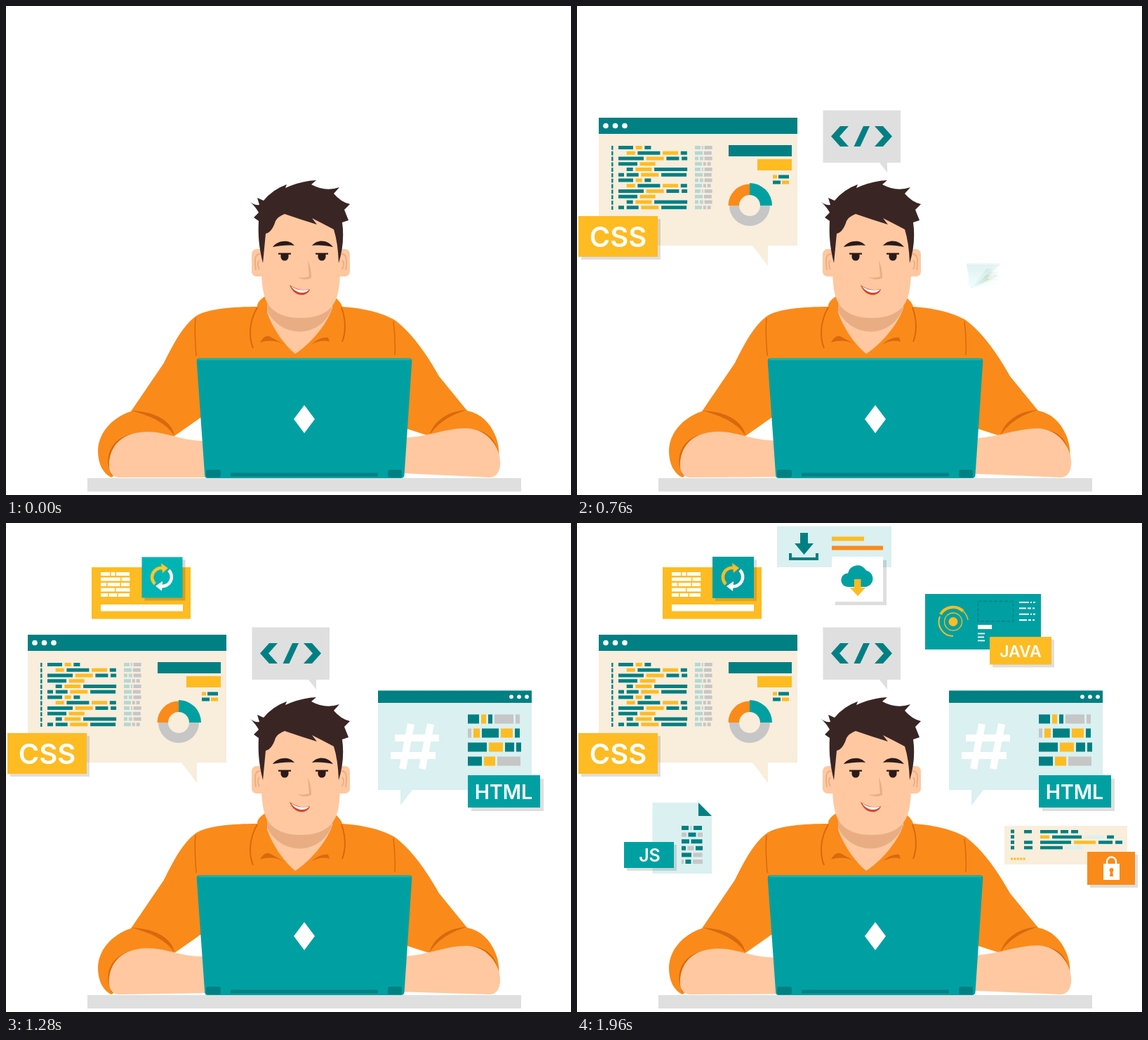
Animation, 805 px wide and 696 px high, one loop 2000 ms. Source, as an HTML page:

```html
<!DOCTYPE html>
<html lang="en">
<head>
<meta charset="utf-8">
<title>Developer at work</title>
<style>
  html, body { margin: 0; width: 100%; height: 100%; overflow: hidden; background: #fff; }
  svg { display: block; width: 100%; height: 100%; }
  text { font: 600 30px Inter, "Open Sans", sans-serif; fill: #fff; text-anchor: middle; }
  .pop { isolation: isolate; }
  .pop use { mix-blend-mode: plus-lighter; }
</style>
</head>
<body>
<svg id="stage" viewBox="0 0 805 696" xmlns="http://www.w3.org/2000/svg"></svg>
<script>
const LOOP = 2000, STEP = 40, SAMPLES = 20;
const C = {
  t: '#00a0a2', d: '#008083', y: '#febc22', o: '#fa8b1a', g: '#c6c6c6', p: '#dfdfdf',
  l: '#dbf0f0', m: '#b4d8d5', c: '#f9eddc', w: '#fff',
  fold: '#d9690e', skin: '#ffc8a0', shade: '#e9ad84', hair: '#3a2525', ink: '#2b1a1a'
};

// Drawing helpers: colours are keys of C.
const rect = (c, x1, y1, x2, y2, r = 0) =>
  `<rect x="${x1}" y="${y1}" width="${x2 - x1}" height="${y2 - y1}" rx="${r}" fill="${C[c]}"/>`;
const path = (c, d) => `<path d="${d}" fill="${C[c]}"/>`;
const line = (c, w, d, extra = '') =>
  `<path d="${d}" fill="none" stroke="${C[c]}" stroke-width="${w}" ${extra}/>`;
const dot = (c, x, y, r) => `<circle cx="${x}" cy="${y}" r="${r}" fill="${C[c]}"/>`;
const label = (s, x, y, size) => `<text x="${x}" y="${y}" style="font-size:${size}px">${s}</text>`;
const tag = (c, x1, y1, x2, y2, depth = 4) =>
  `<path d="M${x1 + depth} ${y1 + depth}H${x2 + depth}V${y2 + depth}H${x1 + depth}Z" opacity=".13"/>` +
  rect(c, x1, y1, x2, y2);

// Rows of bars such as "d21 y9": colour and width; "_" is an empty stretch.
function rows(x0, y0, pitch, height, gap, list) {
  return list.map((row, i) => {
    let x = x0;
    return row.split(' ').map(cell => {
      const w = +cell.slice(1), y = y0 + i * pitch;
      const bar = cell[0] === '_' ? '' : rect(cell[0], x, y, x + w, y + height);
      x += w + gap;
      return bar;
    }).join('');
  }).join('');
}

const desk = rect('p', 116, 672, 734, 691);

const body =
  path('o', `M358 428C357 421 367 414 373 411H466C473 418 478 423 479 428C512 430 538 438 554 447
    C578 465 599 495 617 527L657 576C640 578 615 592 603 612L572 602L560 590H300L277 586L240 612
    C230 590 200 578 178 577L225 508C238 482 251 456 271 441C288 431 322 428 358 428Z`) +
  path('o', `M178 577C150 586 131 609 131 633C131 652 138 665 150 671L200 640L240 612
    C232 590 205 576 178 577Z`) +
  path('o', `M657 576C635 576 612 590 603 612L650 640L700 655C704 640 703 625 697 611
    C689 592 676 580 657 576Z`) +
  path('fold', 'M150 668C138 641 148 608 199 606L180 650Z') +
  path('fold', 'M702 640C698 610 676 597 640 604L670 650Z') +
  path('fold', 'M178 576C213 577 237 591 240 612C231 597 211 584 178 576Z') +
  path('fold', 'M657 575C631 576 609 590 603 612C612 597 629 583 657 575Z') +
  line('fold', 1.5, 'M270 444C268 462 270 480 271 498M552 449C554 465 555 480 554 497') +
  path('skin', 'M372 411V436C380 460 398 484 412 495C432 482 456 456 465 430V411Z') +
  path('shade', 'M372 418V434C392 473 446 474 464 432V418Z') +
  line('fold', 2, 'M358 429C347 448 345 470 352 487M478 429C484 446 485 462 479 478') +
  path('fold', 'M362 479C366 472 370 469 375 470L397 482C384 476 375 475 362 479Z') +
  path('fold', 'M436 481C444 474 453 471 459 472L461 478C452 475 445 477 436 481Z');

const ear = `<rect x="350" y="346" width="24" height="39" rx="7" fill="${C.skin}"/>` +
  line('shade', 1.8, 'M362 353C354 353 354 362 356 376M361 362C357 366 359 371 361 375');
const eye = x => line('ink', 2.2, `M${x - 9} 352.6H${x + 9}`) +
  path('ink', `M${x - 5.5} 353H${x + 5.5}V357A5.5 5.5 0 0 1 ${x - 5.5} 357Z`);

const head =
  ear + `<g transform="matrix(-1 0 0 1 840 0)">${ear}</g>` +
  path('skin', 'M364 285H476V372C476 404 472 421 461 431C450 441 436 444 420 444C404 444 390 441 379 431C368 421 364 404 364 372Z') +
  path('hair', `M366 366C360 342 359 325 360 306L353 301L360 294Q355 285 348 279Q354 284 361 283L358 273L367 277
    Q380 261 400 254L398 259Q420 249 442 248L435 254Q455 265 475 258L467 267Q477 279 490 282L482 290L488 305L479 308
    Q483 337 474 366Q473 337 467 318Q450 309 436 302L443 311Q420 304 397 296Q387 300 384 306Q379 322 370 324Z`) +
  path('ink', 'M380 343C386 334 403 331 411 341C401 340 391 341 380 343Z') +
  path('ink', 'M436 341C444 331 459 333 466 343C456 341 447 340 436 341Z') +
  eye(397) + eye(450) +
  path('shade', 'M430 362Q435 373 435 387Q425 392 415 386Q424 388 432 385Z') +
  `<path d="M404 397Q418 407 433 403C430 414 411 416 404 397Z" fill="#d8452f"/>` +
  path('w', 'M406 399Q418 407 432 403.5C426 411 413 409 406 399Z');

const forearmLeft = path('skin', `M147 656C146 636 156 607 200 606C230 606 245 618 281 619H300V671H160
  C151 670 147 663 147 656Z`);
const forearmRight = path('skin', `M704 650C703 628 684 603 655 603C625 604 600 618 568 621H550V672L690 671
  C700 670 704 662 704 650Z`);

const laptop =
  path('t', 'M275 501.500H575Q578.500 501.500 578.300 506L567.500 668Q567 672 563 672H287Q283.500 672 283.200 668L271.700 506Q271.500 501.500 275 501.500Z') +
  `<path d="M274 503H576" stroke="#12b5ae" stroke-width="2.4"/>` +
  rect('d', 285, 660, 306, 671, 3) + rect('d', 544, 660, 564, 671, 3) + rect('d', 320, 664.5, 530, 669.5) +
  path('w', 'M425 568L440 588L425 608L410 588Z');

const bubble =
  path('p', 'M350.500 148.500H461V223H442V237L431 223H350.500Z') +
  path('d', 'M375 171H387L374 185.500L387 200H375L362 185.500Z') +
  path('d', 'M436 171H424L437 185.500L424 200H436L449 185.500Z') +
  path('d', 'M408 171H417L403.500 200H394.500Z');

const listing = ['d21 y9 d9', '_8 y12 d32 y22 d9', 'd36 y25 d18 d8', 'd27 y22', '_8 d9 y23 d47', 'd8 d17 y25 d36'];
const meter = ['m8 m2 g11', 'm11 g11', 'm5 m5 g11', 'm10 g4 g5'];
const cssWindow =
  path('c', 'M31 159H314V341H272V370L250 341H31Z') + rect('d', 31, 159, 314, 182) +
  [41, 54.5, 68].map(x => dot('w', x, 170.5, 3.8)).join('') +
  line('d', 2.4, 'M50.300 199V290', 'stroke-dasharray="5.800 2"') +
  rows(59, 199, 7.75, 5, 3.7, [...listing, ...listing]) +
  rows(168, 199, 7.75, 5, 1.8, [...meter, ...meter, ...meter]) +
  rect('d', 216, 198, 306, 214) + rect('y', 257, 218, 306, 234) +
  rows(279, 240.5, 8, 5, 2, ['y6 d15', 'd11 y10']) +
  path('g', 'M217 284A29 29 0 0 0 275 284H261A15 15 0 0 1 231 284Z') +
  path('o', 'M246 253.500A30.500 30.500 0 0 0 215.500 284H231A15 15 0 0 1 246 269Z') +
  path('t', 'M246 252A32 32 0 0 1 278 284H261A15 15 0 0 0 246 269Z');
const cssTag = tag('y', 2, 299, 115, 357) + label('CSS', 58.5, 343, 40);

const htmlWindow =
  path('l', 'M530 239H749V380H579L562 402V380H530Z') + rect('d', 530, 238.5, 749, 256) +
  [720, 731, 742].map(x => dot('w', x, 247.3, 2.9)).join('') +
  line('w', 10, 'M577 286L565 350M605 286L593 350M554 306H617M548 331H612') +
  rows(658, 272.5, 20, 13, 3, ['d16 y7 d6 g27 g6', 'g5 y9 d24 y17 d7', 'd27 y20 d13 d7', 'd20 y16 g33']);
const htmlTag = tag('t', 658, 359, 761, 405, 5) + label('HTML', 709, 393, 28.5);

const noteCard =
  rect('y', 122, 63, 263, 136.5) +
  rows(135, 70, 7.5, 5, 1.5, ['w13 w6 w19', 'w28 w12', 'w8 w18 w12', 'w20 w20', 'w10 w12 w16']) +
  rect('w', 135, 116, 252, 125.5);
const syncTag = tag('t', 193, 48, 252, 107) +
  line('y', 4.6, 'M212 87A13.500 13.500 0 0 1 224 64') + path('y', 'M221 57L231 64L223 71Z') +
  line('w', 4.6, 'M232 67A13.500 13.500 0 0 1 220 90') + path('w', 'M223 83L213 90L222 97Z');

const downloadCard =
  rect('l', 285, 4.5, 448, 63) +
  path('d', 'M318 14H329V29H337L323.500 45L310 29H318Z') + line('d', 4, 'M304 43V51H342V43') +
  rect('y', 363, 19.5, 409, 25.5) + rect('o', 363, 32.5, 436, 38.5);
const cloudTag = tag('w', 363, 48, 436, 112, 5) +
  path('t', 'M386 91A9.500 9.500 0 0 1 386 71.500A14 14 0 0 1 412 67.500A12 12 0 0 1 412 91Z') +
  path('y', 'M395 80H404.500V92H411L400 104L389 92H395Z');

const javaCard =
  rect('t', 496, 101, 661, 180) + dot('y', 536, 140.5, 6.5) +
  `<circle cx="536" cy="140.5" r="12.500" fill="none" stroke="${C.y}" stroke-width="1.300"/>` +
  line('y', 2, 'M536 161A20.500 20.500 0 0 1 517 133') +
  line('y', 4, 'M518 130A20.500 20.500 0 0 1 550 125.500') +
  line('y', 1.5, 'M550 125.500A20.500 20.500 0 0 1 557 138') +
  line('d', 1.5, 'M571.500 111.500H621.500V140H571.500Z', 'stroke-dasharray="5 2.500"') +
  rows(630, 112, 8.4, 2, 2, ['w14 w2 w3', 'w10 w5 w3', 'w14 w2 w3', 'w11 w4 w3']) +
  rect('w', 571, 145, 591, 151) + rows(571, 156.5, 5, 1.8, 1, ['w10', 'w9', 'w10']);
const javaTag = tag('y', 588, 162, 676, 201.5) + label('JAVA', 632, 190.5, 23);

const jsPage =
  path('l', 'M107.500 398H173L192 417V499H107.500Z') + path('d', 'M173 398L192 417H173Z') +
  rows(149, 431, 9.6, 6, 2.5, ['d10 g2 d12', 'g7 d11 g7', 'd11 d16', 'd6 g9 d10', 'd14 g13', 'g3 d8 g14']);
const jsTag = tag('t', 67, 454, 138, 491) + label('JS', 103.5, 482, 25);

const lockCard =
  rect('c', 609, 431, 784, 486) + rows(618, 436.5, 7.7, 5, 1, ['d5', 'd5', 'd5', 'd5']) +
  rows(637, 437, 7.6, 4.6, 4, ['d11 _4 d25 d11 d10', '_11 _4 y13 d42 l28 d10', 'd12 _3 d44 y31 d20 d10', 'd12 _3 d32 l24']) +
  rows(618, 476.5, 1, 3, 1.4, ['y3 y3 y3 y3 y3']);
const lockTag = tag('o', 727, 468, 795, 515) +
  line('w', 2.5, 'M755 487V482A6.500 6.500 0 0 1 768 482V487') + rect('w', 750, 485, 773, 508) +
  dot('o', 761.5, 494, 3) + path('o', 'M760 495H763L764 503H759Z');

// Each pop: art, start time, point it grows from; tags follow their panel.
const pops = [];
const panel = (start, x, y, art) => pops.push({ art, start, x, y, length: 90, shutter: 20, ease: p => p });
const badge = (start, x, y, art) =>
  pops.push({ art, start: start + 70, x, y, length: 100, shutter: 8, ease: p => 1 - (1 - p) ** 2 });
panel(340, 441, 236, bubble);
panel(540, 272, 370, cssWindow);      badge(540, 58.5, 328, cssTag);
panel(740, 562, 402, htmlWindow);     badge(740, 709.5, 382, htmlTag);
panel(1120, 192.5, 100, noteCard);    badge(1120, 222.5, 77.5, syncTag);
panel(1320, 366, 34, downloadCard);   badge(1320, 399.5, 80, cloudTag);
panel(1520, 578, 140, javaCard);      badge(1520, 632, 182, javaTag);
panel(1770, 150, 448, jsPage);        badge(1770, 102.5, 472.5, jsTag);
panel(1770, 696, 458, lockCard);      badge(1770, 761, 491.5, lockTag);

const stage = document.getElementById('stage');
stage.innerHTML =
  `<defs>${pops.map((p, i) => `<g id="art${i}">${p.art}</g>`).join('')}</defs>` +
  body + `<g id="armL">${forearmLeft}</g><g id="armR">${forearmRight}</g>` + head +
  '<path d="M0 672H805V696H0Z" fill="#fff"/>' + desk + laptop +
  pops.map((p, i) => `<g class="pop">${`<use href="#art${i}"/>`.repeat(SAMPLES)}</g>`).join('');

const armL = document.getElementById('armL'), armR = document.getElementById('armR');
stage.querySelectorAll('.pop').forEach((group, i) => {
  pops[i].group = group;
  pops[i].copies = [...group.children];
});

const clamp = v => Math.min(1, Math.max(0, v));

// Averages several moments of the open shutter to smear the fast growth.
function drawPop(pop, time) {
  const age = time - pop.start;
  pop.group.style.display = age > 0 ? '' : 'none';
  if (age <= 0) return;
  const settled = age >= pop.length + pop.shutter;
  pop.copies.forEach((copy, k) => {
    const moment = age - pop.shutter * k / SAMPLES;
    const s = settled ? 1 : pop.ease(clamp(moment / pop.length));
    copy.style.display = settled && k ? 'none' : '';
    copy.setAttribute('opacity', settled ? 1 : 1 / SAMPLES);
    copy.setAttribute('transform', `translate(${pop.x * (1 - s)} ${pop.y * (1 - s)}) scale(${s})`);
  });
}

function draw(time) {
  const lift = (1 - Math.cos(time / 400 * 2 * Math.PI)) / 2;
  armL.setAttribute('transform', `rotate(${-2.8 * lift} 160 655)`);
  armR.setAttribute('transform', `rotate(${3.2 * (1 - lift)} 690 655)`);
  pops.forEach(pop => drawPop(pop, time));
}

const begin = performance.now();
function tick() {
  const time = (performance.now() - begin) % LOOP;
  draw(Math.floor(time / STEP) * STEP);
  requestAnimationFrame(tick);
}
tick();
</script>
</body>
</html>
```
